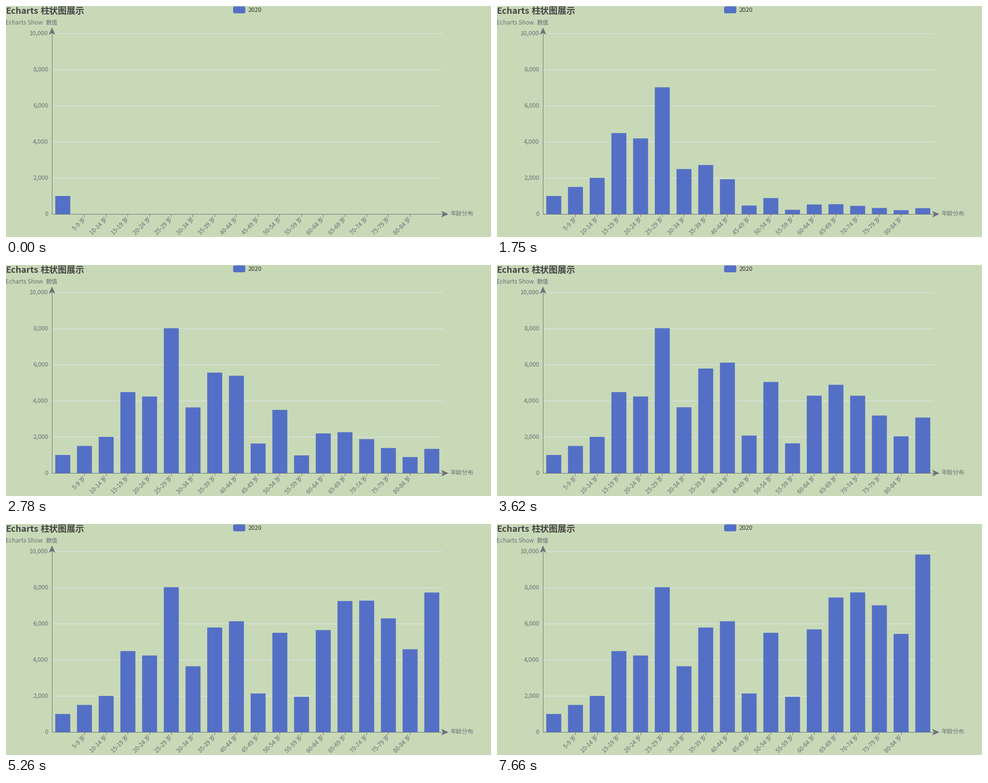
A matplotlib script that plays this animation: 993 px wide and 473 px high, repeating every 7730 ms.

```python
import numpy as np
import matplotlib.pyplot as plt
from matplotlib.animation import FuncAnimation
from matplotlib.patches import FancyBboxPatch, Polygon, Rectangle

W, H, DPI = 993, 473, 64
LOOP, FRAMES = 7730, 99

LEFT, RIGHT, TOP, BASE = 94, 894, 56, 426
Y_MAX = 10000
BLUE, GREY, GRID = "#5470c6", "#6e7079", "#e0e6f1"
BACK, TITLE, DARK = "#c8d9b7", "#464646", "#333333"

VALUES = np.array([1000, 1500, 2000, 4480, 4235, 8014, 3640, 5784, 6130,
                   2135, 5492, 1951, 5681, 7446, 7727, 7013, 5432, 9856])
COUNT = len(VALUES)
STEP = (RIGHT - LEFT) / COUNT
BAR = STEP * 0.69
DURATION = 490  # ms per bar index: each bar grows slower than the one before

plt.rcParams["font.family"] = "Noto Sans CJK JP"
fig = plt.figure(figsize=(W / DPI, H / DPI), dpi=DPI, facecolor=BACK)
ax = fig.add_axes([0, 0, 1, 1])
ax.set_xlim(0, W)
ax.set_ylim(H, 0)
ax.axis("off")


def rect(x, y, w, h, color, z=1):
    return ax.add_patch(Rectangle((x, y), w, h, fc=color, lw=0,
                                  snap=False, zorder=z))


def label(x, y, s, size=12, color=GREY, **kw):
    kw.setdefault("va", "baseline")
    return ax.text(x, y, s, fontsize=size * 72 / DPI, color=color, **kw)


def arrow(points):
    ax.add_patch(Polygon(points, fc=GREY, lw=0, snap=False, zorder=4))


def draw_header():
    label(-1, 15.5, "Echarts", 18, TITLE, weight="bold")
    label(70.5, 15.5, "柱状图展示", 18, TITLE, weight="bold")
    label(-1, 38, "Echarts Show")
    ax.add_patch(FancyBboxPatch((465, 1), 25, 14, fc=BLUE, lw=0, snap=False,
                                boxstyle="round,pad=0,rounding_size=3.5"))
    label(495, 11.5, "2020", 12.5, DARK)


def draw_axes():
    for v in range(0, Y_MAX + 1, 2000):
        y = BASE - v / Y_MAX * (BASE - TOP)
        if v:
            rect(LEFT, y, RIGHT - LEFT, 1, GRID)
        label(86.5, y + 4, f"{v:,}", 12.5, ha="right")

    rect(LEFT, TOP - 2, 1, BASE - TOP + 3, GREY, 2)
    rect(LEFT, BASE, RIGHT - LEFT + 2, 1, GREY, 2)
    wing = 20 / 3
    cx, cy = LEFT + 0.2, BASE + 0.2
    arrow([(cx, 44), (cx + wing, 59), (cx, 55.25), (cx - wing, 59)])
    arrow([(906, cy), (891, cy + wing), (894.75, cy), (891, cy - wing)])
    label(LEFT, 38, "数值", ha="center")
    label(909, 429, "年龄分布")

    for i in range(1, COUNT - 1):
        x = LEFT + (i + 0.5) * STEP
        rect(int(x), BASE + 1, 1, 5, GREY, 2)
        label(x + 3, 437, f"{5 * i}-{5 * i + 4} 岁", ha="right",
              rotation=45, rotation_mode="anchor")


def ease(p):
    return np.where(p < 0.5, 4 * p ** 3, 1 - 4 * (1 - p) ** 3)


draw_header()
draw_axes()
bars = [rect(LEFT + i * STEP + (STEP - BAR) / 2, BASE, BAR, 0, BLUE, 3)
        for i in range(COUNT)]


def elapsed(k):
    """Time since the bars began to grow; the pace drops slightly midway."""
    return 0 if k < 2 else np.interp(k, [2, 53, 98], [113, 4106, 7554])


def update(k):
    spans = np.maximum(np.arange(COUNT) * DURATION, 1)
    p = np.clip(elapsed(k) / spans, 0, 1)
    p[0] = 1
    heights = VALUES * ease(p) / Y_MAX * (BASE - TOP)
    for bar, h in zip(bars, heights):
        bar.set_y(BASE - h)
        bar.set_height(h)
    return bars


anim = FuncAnimation(fig, update, frames=FRAMES, init_func=lambda: update(0),
                     interval=LOOP / FRAMES, repeat=True, repeat_delay=0)
plt.show()
```
